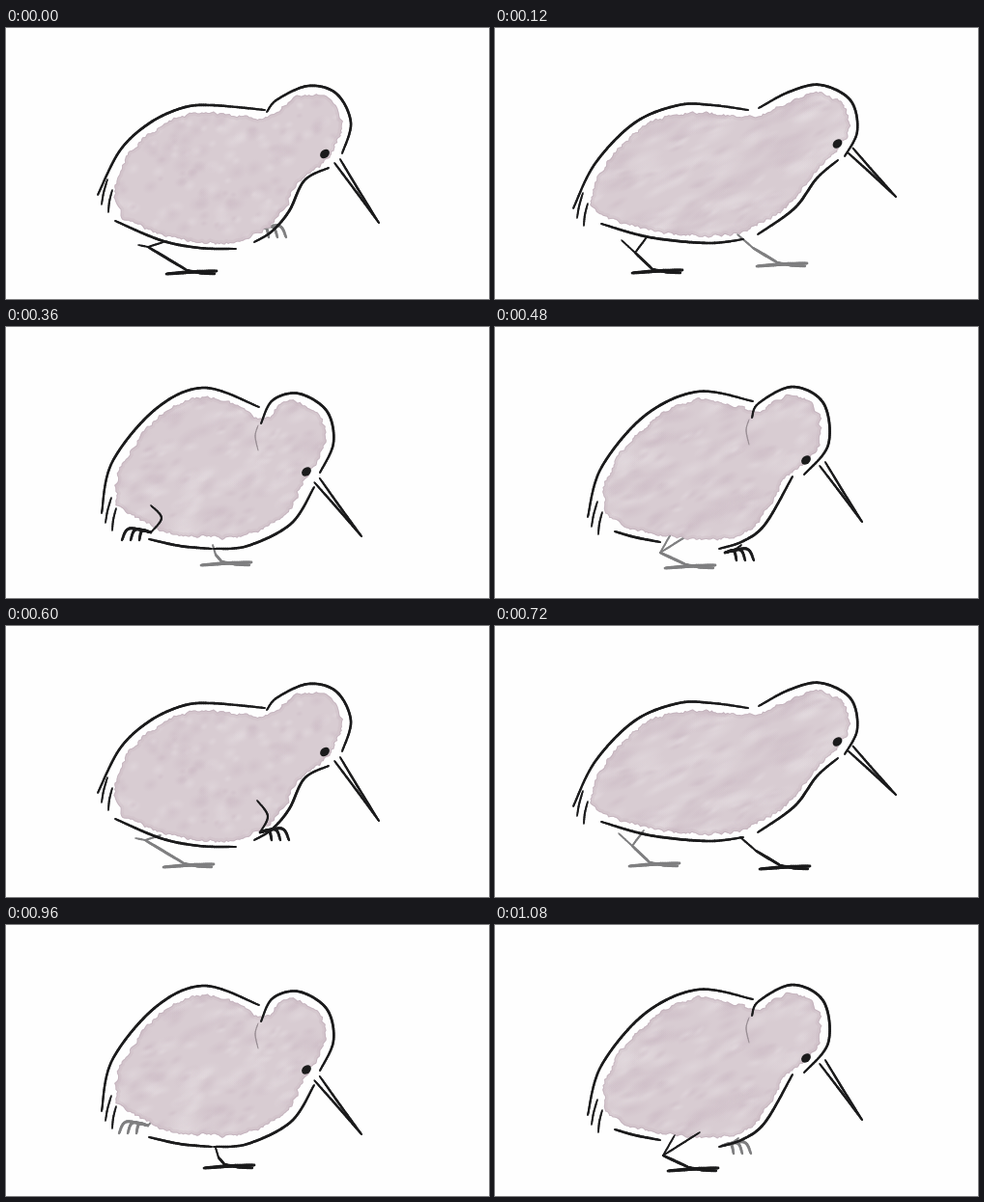
Animation, 500 px wide and 281 px high, one loop 1200 ms. Source, as an HTML page with a canvas:

```html
<!DOCTYPE html>
<html lang="en">
<head>
<meta charset="utf-8">
<title>Walking kiwi</title>
<style>
  html, body { margin: 0; width: 100%; height: 100%; overflow: hidden; background: #fefefe; }
  canvas { display: block; width: 500px; height: 281px; }
</style>
</head>
<body>
<canvas id="stage"></canvas>
<script>
const STEP = 120, W = 500, H = 281;
const INK = '#1b1b1c', FAR = '#7f7f80';
const canvas = document.getElementById('stage');
const ctx = canvas.getContext('2d');
const dpr = window.devicePixelRatio || 1;
canvas.width = W * dpr;
canvas.height = H * dpr;

const points = text => text.split(' ').map(p => p.split(',').map(Number));

// Key points of one half-stride, clockwise from the tail.
// gap: space between plumage and underside; streak: stretch of the mottling.
const bodies = [
  { gap: 5, streak: 1.3, eye: '330,130.5', beak: '343,138 386,202',
    back: '95,173 118,127 148,99 182,83 212,80 268,85',
    head: '270,87 281,74 313,60 342,68 357,98 348,130',
    chest: '334,145 309,158 293,190 275,211 257,222', belly: '238,229 200,228 160,220 113,200' },
  { gap: 7, streak: 3, eye: '354.5,120', beak: '368,127 415,175',
    back: '81,187 104,140 145,98 190,80 225,80 262,85',
    head: '273,83 305,66 337,59 368,75 375,107 362,133',
    chest: '355,137 333,156 310,187 272,214', belly: '257,219 220,223 160,217 110,203' },
  { gap: 8, streak: 2.4, eye: '343,129', beak: '355,137 406,199',
    back: '95,184 115,143 160,93 210,72 270,87',
    head: '271,93 296,73 328,68 360,84 366,108 352,134',
    chest: '348,140 327,154 295,194 253,223', belly: '209,226 170,219 130,206' },
  { gap: 11, streak: 2, hunched: true, eye: '311,150', beak: '322,159 368,217',
    back: '99,193 110,140 155,85 205,63 262,83',
    head: '264,100 276,76 303,69 332,87 339,120 325,151',
    chest: '319,166 295,204 250,227 215,230', belly: '213,230 180,227 148,220' },
  { gap: 7, streak: 2.4, hunched: true, eye: '322,138', beak: '339,142 380,202',
    back: '96,197 110,146 155,92 210,67 267,77',
    head: '266,94 273,79 308,62 340,79 345,122 320,153',
    chest: '308,155 280,204 257,222 232,230', belly: '171,223 145,218 124,212' }
];

// Hip, knee and ankle through a full stride; both legs share it half a cycle apart.
const stride = [
  '163,222 147,227 187,251', '157,217 145,233 163,250', '146,216 121,220 134,241',
  '150,185 161,198 150,213', '255,226 248,231 238,234', '260,181 271,197 263,214',
  '254,219 270,233 295,248', '252,206 236,233 270,249', '217,231 220,241 226,248',
  '212,215 174,239 200,251'
].map(points);
const lifted = phase => phase > 2 && phase < 6;

function random(seed) {
  return () => {
    seed = (seed * 1664525 + 1013904223) >>> 0;
    return seed / 4294967296;
  };
}

// Catmull-Rom sampling about every two pixels.
function spline(pts, closed) {
  const n = pts.length, out = [];
  const at = i => closed ? pts[(i + n) % n] : pts[Math.max(0, Math.min(n - 1, i))];
  for (let i = 0; i < (closed ? n : n - 1); i++) {
    const [a, b, c, d] = [at(i - 1), at(i), at(i + 1), at(i + 2)];
    const steps = Math.max(3, Math.round(Math.hypot(c[0] - b[0], c[1] - b[1]) / 2));
    for (let s = 0; s < steps; s++) {
      const t = s / steps;
      out.push([0, 1].map(k => b[k] + .5 * t * (c[k] - a[k] +
        t * (2 * a[k] - 5 * b[k] + 4 * c[k] - d[k] + t * (3 * (b[k] - c[k]) + d[k] - a[k])))));
    }
  }
  if (!closed) out.push(pts[n - 1]);
  return out;
}

// Stroke that swells in the middle.
function brush(pts, width, color = INK) {
  const line = spline(pts);
  ctx.strokeStyle = color;
  ctx.lineCap = 'round';
  for (let i = 1; i < line.length; i++) {
    const swell = Math.sin(Math.PI * (i - .5) / (line.length - 1));
    ctx.lineWidth = width * (.7 + .35 * Math.sqrt(swell));
    ctx.beginPath();
    ctx.moveTo(...line[i - 1]);
    ctx.lineTo(...line[i]);
    ctx.stroke();
  }
}

// Moves each point of a clockwise ring inwards by inset(i).
function shrink(ring, reach, inset) {
  const n = ring.length;
  return ring.map(([x, y], i) => {
    const a = ring[(i + n - reach) % n], b = ring[(i + reach) % n];
    const dx = b[0] - a[0], dy = b[1] - a[1], len = Math.hypot(dx, dy) || 1;
    const d = inset(i);
    return [x - dy / len * d, y + dx / len * d];
  });
}

function smooth(ring, reach) {
  const n = ring.length;
  return ring.map((_, i) => {
    let x = 0, y = 0;
    for (let j = -reach; j <= reach; j++) {
      const p = ring[(i + j + n) % n];
      x += p[0];
      y += p[1];
    }
    return [x / (2 * reach + 1), y / (2 * reach + 1)];
  });
}

function plumage(body, rnd) {
  const top = [...spline(points(body.back)), ...spline(points(body.head))];
  const under = [...spline(points(body.chest)), ...spline(points(body.belly))];
  const inner = shrink([...top, ...under], 3,
    i => i < top.length ? 8.5 + 11 * Math.exp(-i / 12) : body.gap);
  const edge = spline(smooth(inner, 4).filter((_, i) => i % 6 === 0), true);
  let drift = 0;
  const shape = new Path2D();
  shrink(edge, 1, () => drift = drift * .65 + (rnd() - .5) * 2.8)
    .forEach(p => shape.lineTo(...p));
  shape.closePath();
  return shape;
}

function wash(body) {
  const rnd = random(bodies.indexOf(body) * 12 + 11);
  const shape = plumage(body, rnd);
  ctx.fillStyle = '#d8ccd2';
  ctx.fill(shape);
  ctx.save();
  ctx.clip(shape);
  for (let i = 0; i < 240; i++) {
    const tone = i % 2 ? '228,220,224' : '204,187,197';
    const r = 3 + rnd() * 6;
    ctx.save();
    ctx.translate(100 + rnd() * 270, 65 + rnd() * 160);
    ctx.rotate(-.45 + (rnd() - .5) * .5);
    ctx.scale(body.streak, 1);
    const soft = ctx.createRadialGradient(0, 0, 0, 0, 0, r);
    soft.addColorStop(0, `rgba(${tone},.5)`);
    soft.addColorStop(1, `rgba(${tone},0)`);
    ctx.fillStyle = soft;
    ctx.fillRect(-r, -r, 2 * r, 2 * r);
    ctx.restore();
  }
  ctx.lineJoin = 'round';
  for (const [width, alpha] of [[7, .2], [2, .6]]) {
    ctx.lineWidth = width;
    ctx.strokeStyle = `rgba(188,171,182,${alpha})`;
    ctx.stroke(shape);
  }
  ctx.restore();
}

function leg(phase, color, dx = 0, dy = 0) {
  const [hip, knee, ankle] = stride[phase].map(([x, y]) => [x + dx, y + dy]);
  const [x, y] = ankle;
  if (lifted(phase)) {
    const side = phase === 3 ? -1 : 1;
    brush([hip, knee, ankle], 2.1, color);
    for (let i = 0; i < 3; i++) {
      const len = side * (12 + 9 * i);
      brush([[x, y], [x + len * .75, y - 2 - i], [x + len, y + 8]], 2.9, color);
    }
    return;
  }
  if (knee[0] < hip[0]) brush([[hip[0] - 26, hip[1] + 3], knee], 1.8, color);
  brush([hip, knee], 2, color);
  brush([knee, ankle], 2.8, color);
  brush([[x - 21, y + 4], [x + 5, y + 2], [x + 31, y + 1]], 3.5, color);
  brush([ankle, [x + 14, y + 3], [x + 29, y + 4]], 2.8, color);
}

function outline(body) {
  for (const part of ['back', 'head', 'chest', 'belly']) brush(points(body[part]), 2.6);

  const [tail] = points(body.back);
  for (let k = 1; k < 3; k++) {
    brush([[5 + 5 * k, 11 * k - 27], [6 * k, 9 * k - 11], [7 * k - 3, 8 * k + 2]]
      .map(([x, y]) => [tail[0] + x, tail[1] + y]), 2);
  }

  if (body.hunched) {
    const [[x, y]] = points(body.head);
    brush([[x - 3, y + 2], [x - 6, y + 13], [x - 3, y + 28]], 1.2, '#9a8f95');
  }

  const [base, tip] = points(body.beak);
  const angle = Math.atan2(tip[1] - base[1], tip[0] - base[0]);
  const nx = Math.sin(angle), ny = -Math.cos(angle);
  for (const side of [-1, 1]) {
    const off = d => [base[0] + nx * side * d, base[1] + ny * side * d];
    const [x, y] = off(3);
    brush([off(3.5), [(x + tip[0]) / 2, (y + tip[1]) / 2], tip], 2.3);
  }

  const [[x, y]] = points(body.eye);
  ctx.fillStyle = INK;
  ctx.beginPath();
  ctx.ellipse(x, y, 5.4, 4.1, -.7, 0, 2 * Math.PI);
  ctx.fill();
}

function draw(phase) {
  const body = bodies[phase % 5];
  ctx.setTransform(dpr, 0, 0, dpr, 0, 0);
  ctx.fillStyle = '#fefefe';
  ctx.fillRect(0, 0, W, H);
  leg((phase + 5) % 10, FAR, -3, -5);
  wash(body);
  outline(body);
  leg(phase, INK);
}

const start = performance.now();
let shown = -1;
function tick() {
  const phase = Math.floor((performance.now() - start) / STEP) % stride.length;
  if (phase !== shown) draw(shown = phase);
  requestAnimationFrame(tick);
}
tick();
</script>
</body>
</html>
```
